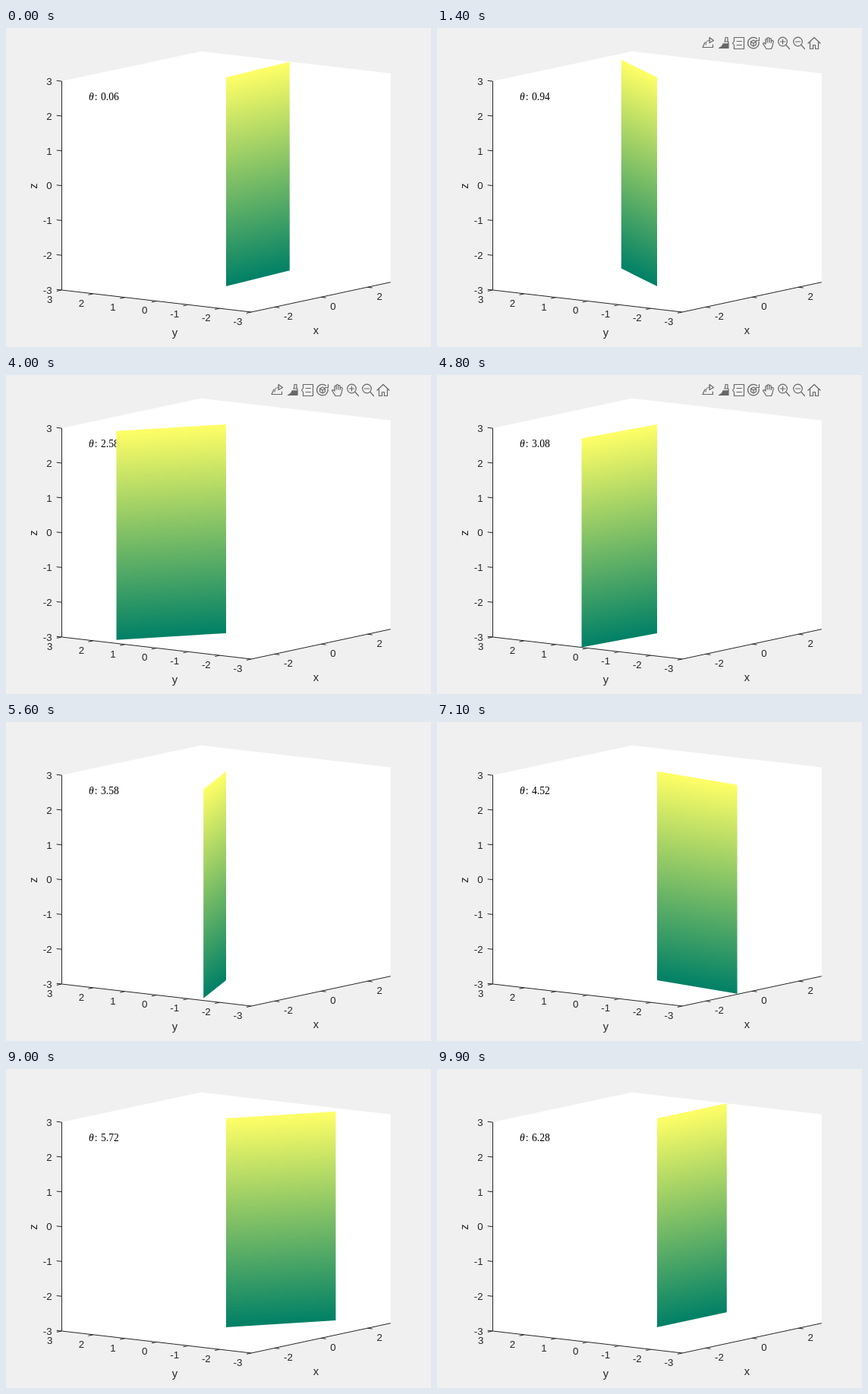
An HTML page that plays this animation: 560 px wide and 420 px high, repeating every 10 s.

```html
<!DOCTYPE html>
<html lang="en">
<head>
<meta charset="utf-8">
<title>Rotating half plane</title>
<style>
html, body { margin: 0; width: 100%; height: 100%; overflow: hidden; background: #f0f0f0; }
svg { display: block; width: 560px; height: 420px; }
text { font: 13.3px "Liberation Sans", Arial, sans-serif; fill: #262626; }
.name { font-size: 14.7px; text-anchor: middle; }
#label text { font: 13.6px "Liberation Serif", Times, serif; fill: #000; }
#label .theta { font-style: italic; }
#axes { stroke: #262626; fill: none; }
#tools { stroke: #686868; stroke-width: 1.2; fill: none; stroke-linejoin: round; stroke-linecap: round; }
#tools .solid { fill: #686868; }
</style>
</head>
<body>
<svg viewBox="0 0 560 420">
  <defs>
    <linearGradient id="summer" x1="0" y1="0" x2="0" y2="1">
      <stop offset="0" stop-color="#ffff66"/>
      <stop offset="1" stop-color="#008066"/>
    </linearGradient>
  </defs>
  <rect width="560" height="420" fill="#f0f0f0"/>
  <polygon id="walls" fill="#fff"/>
  <path id="axes"/>
  <g id="ticks"></g>
  <text class="name" x="222.5" y="405.5">y</text>
  <text class="name" x="408.5" y="402.5">x</text>
  <text class="name" transform="translate(41 208) rotate(-90)">z</text>
  <g id="tools" visibility="hidden">
    <!-- export -->
    <path d="M353 19L350 25.500H363.500V22M354 22C354 18 357 16 360 16"/>
    <path d="M359 12.500L364.500 16.500L359 19.500Z"/>
    <!-- brush -->
    <path d="M380 12.500H383V18H379.500ZM378.500 18H384V21H377"/>
    <path class="solid" d="M377 21H384V26.500H371.500Q376 25 377 21Z"/>
    <!-- data tip -->
    <path d="M391.500 12.500H404.500V27.500H391.500V22.500L389.500 20L391.500 17.500ZM395 17.500H401.500M395 22.500H401.500"/>
    <!-- rotate -->
    <path d="M421.500 14A7.300 7.300 0 1 0 424 18M424.500 12.500V16.500H420.500"/>
    <path d="M417 16L420.500 18V22L417 24L413.500 22V18ZM413.500 18L417 20L420.500 18M417 20V24"/>
    <!-- pan -->
    <path d="M434 27.500L429.500 20.500Q430.500 18.500 433 21V15Q434 13 435.300 15V19V13.500Q436.500 11.500 437.800 13.500V19V14.500Q439 12.500 440.300 14.500V19.500V17Q442 15.500 443.300 17.500L442 24L440.500 27.500Z"/>
    <!-- zoom -->
    <g id="lens"><circle cx="455.500" cy="18" r="5.800"/><path d="M460 22.500L464.500 27.500M452.500 18H458.500"/></g>
    <use href="#lens" x="20"/>
    <path d="M455.500 15V21"/>
    <!-- home -->
    <path d="M489 20L497 12.500L505 20M491.500 18.500V27.500H495.500V22.500H498.500V27.500H502.500V18.500"/>
  </g>
  <g id="label">
    <text class="theta" x="109" y="95">θ</text>
    <text x="116.800" y="95">:</text>
    <text id="value" x="125" y="95"></text>
  </g>
  <rect id="plane" width="1" height="1" fill="url(#summer)"/>
</svg>
<script>
const $ = id => document.getElementById(id);
const svg = document.querySelector('svg');
const STEP = 100, STEPS = 100, R = 3;
const TOOLS_ON = 600, TOOLS_OFF = 5600;

// Orthographic projection to the stage, and depth away from the viewer
const project = (x, y, z) => [290 + 30.6 * x - 41.67 * y, 202.4 - 6.55 * x - 4.83 * y - 45.83 * z];
const depth = (x, y) => 41.67 * x + 30.6 * y;
const LABEL_DEPTH = depth(-2.5, 2.5);

const corners = [[-3, 3, 3], [3, 3, 3], [3, -3, 3], [3, -3, -3], [-3, -3, -3], [-3, 3, -3]];
$('walls').setAttribute('points', corners.map(c => project(...c)).join(' '));

let lines = 'M73.5 70V345L323.2 374L506.8 334.7';

function tick([x, y], dx, dy, n, tx, ty, anchor) {
  lines += `M${x} ${y}l${dx} ${dy}`;
  const t = document.createElementNS(svg.namespaceURI, 'text');
  t.setAttribute('x', x + tx);
  t.setAttribute('y', y + ty + 4.8);
  t.setAttribute('text-anchor', anchor);
  t.textContent = n;
  $('ticks').append(t);
}

for (let n = -3; n <= 3; n++) {
  tick(project(-3, 3, n), -6.5, -0.75, n, -12.5, 0, 'end');
  tick(project(-3, n, -3), -6.3, 1.35, n, -11.8, 12, 'end');
  if (n % 2 === 0) tick(project(n, -3, -3), 6.5, 0.75, n, 12.3, 11.7, 'start');
}
$('axes').setAttribute('d', lines);

const [hingeX, hingeY] = project(0, 0, R);
const planeH = project(0, 0, -R)[1] - hingeY;
let shown = -1;

function draw(now) {
  const step = Math.floor(now / STEP) % STEPS;
  if (step !== shown) {
    shown = step;
    const theta = (step + 1) * 2 * Math.PI / STEPS;
    const x = R * Math.cos(theta), y = R * Math.sin(theta);
    const [edgeX, edgeY] = project(x, y, R);
    $('plane').setAttribute('transform',
      `matrix(${edgeX - hingeX} ${edgeY - hingeY} 0 ${planeH} ${hingeX} ${hingeY})`);
    $('value').textContent = theta.toFixed(2);
    // The nearer of label and plane is painted last
    svg.insertBefore($('label'), depth(x, y) < LABEL_DEPTH ? $('plane') : null);
    const t = step * STEP;
    $('tools').setAttribute('visibility', t >= TOOLS_ON && t < TOOLS_OFF ? 'visible' : 'hidden');
  }
  requestAnimationFrame(draw);
}
draw(performance.now());
</script>
</body>
</html>
```
